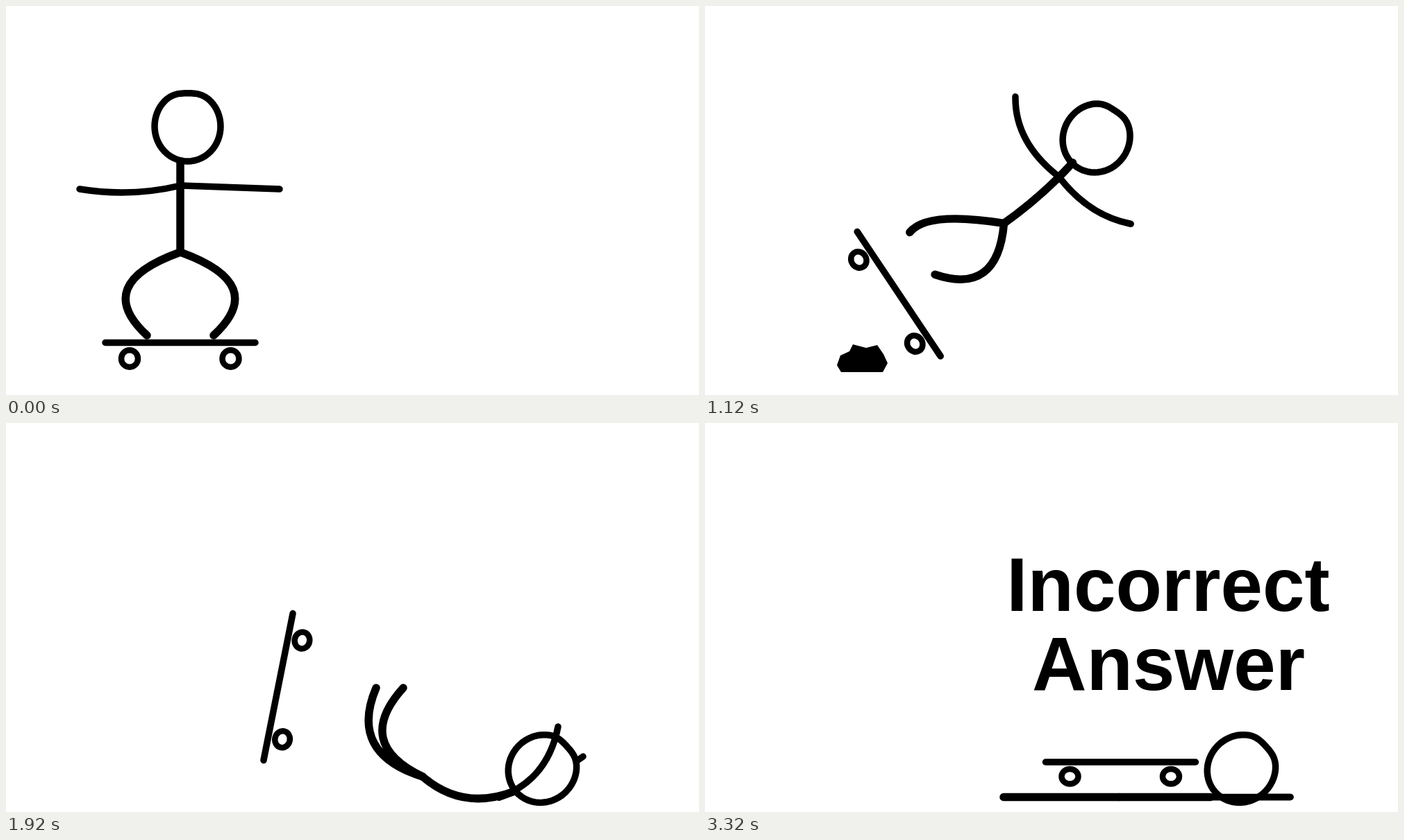
An HTML page for the animation above (3.76 s loop, 998x561 px).

```html
<!DOCTYPE html>
<html lang="en">
<head>
<meta charset="utf-8">
<title>Incorrect Answer</title>
<style>
  html, body { margin: 0; width: 100%; height: 100%; overflow: hidden; background: #fff; }
  svg { display: block; width: 100%; height: 100%; }
  .ink { fill: none; stroke: #000; stroke-width: 9.5; stroke-linecap: round; stroke-linejoin: round; }
  .thick { stroke-width: 11.5; }
  .head { fill: #fff; }
  .wheel { stroke-width: 8.5; }
  text { font: bold 108.8px "Liberation Sans", Arial, sans-serif; text-anchor: middle; }
</style>
</head>
<body>
<svg viewBox="0 0 998 561">
  <path id="rock" d="M0 518l5-14 13-6 5-10 19 5 16-4 9 13 6 13-7 13H6z"/>
  <g id="board" class="ink">
    <path d="M-108 0H108"/>
    <ellipse class="wheel" cx="-73" rx="12"/>
    <ellipse class="wheel" cx="72.500" rx="12"/>
  </g>
  <g class="ink">
    <path id="armR"/>
    <path id="head" class="head"/>
    <path id="armL"/>
    <path id="spine" class="thick"/>
    <path id="legs" class="thick"/>
  </g>
  <text id="word1" x="667">Incorrect</text>
  <text id="word2" x="667.500">Answer</text>
</svg>
<script>
const LOOP = 3760, STEP = 40;
const TRIP = 920, FLY = 1360, LAND = 1660, CRASH = 1920, FLAT = 2220;
const TOUCH = 2253, STOP = 3320, GROUND = 539.5, SPIN = 107;
const $ = id => document.getElementById(id);
const clamp = u => Math.max(0, Math.min(1, u));
const lerp = (a, b, u) => a + (b - a) * u;
const span = (t, from, to) => clamp((t - from) / (to - from));

// A pose is a set of joints; elbows, knees and back are curve handles.
const stand = {
  tilt: 0, head: [261.5, 173.5],
  neck: [251, 225], back: [251, 290], hip: [251, 355], shoulder: [251, 259],
  elbowL: [180, 276], handL: [106, 264], elbowR: [300, 261], handR: [394, 264],
  kneeL: [123, 401], footL: [203, 475], kneeR: [379, 401], footR: [299, 475]
};
const fly = {
  tilt: 73, head: [766.5, 344.5],
  neck: [716, 352], back: [648, 348], hip: [587, 313], shoulder: [694, 350],
  elbowL: [708, 261], handL: [793, 267.5], elbowR: [658, 440], handR: [742, 460],
  kneeL: [500, 247], footL: [527, 171], kneeR: [479, 286], footR: [488.5, 199]
};
const crash = {
  tilt: 48, head: [772.5, 498.5],
  neck: [732, 531], back: [658, 560], hip: [600, 510], shoulder: [710, 540],
  elbowL: [780, 515], handL: [795, 438], elbowR: [785, 515], handR: [831, 481],
  kneeL: [500, 462], footL: [572, 382], kneeR: [493, 476], footR: [533, 382]
};

const isLeg = joint => /knee|foot/.test(joint);
const mapPose = (pose, fn) => Object.fromEntries(
  Object.entries(pose).map(([k, v]) => [k, k === 'tilt' ? v : fn(v, k)]));

function mix(a, b, u) {
  const pose = mapPose(a, (p, k) => p.map((v, i) => lerp(v, b[k][i], u)));
  pose.tilt = lerp(a.tilt, b.tilt, u);
  return pose;
}

// Legs keep their flying shape on landing, then everything sinks to the ground.
const land = mapPose(crash, (p, k) =>
  isLeg(k) ? fly[k].map((v, i) => v + crash.hip[i] - fly.hip[i]) : p);
const lieX = { neck: 728, back: 660, hip: 596, shoulder: 705, elbow: 770, hand: 843, knee: 510, foot: 430 };
const flat = mapPose(crash, (p, k) => k === 'head' ? p : [lieX[k.replace(/[LR]$/, '')], GROUND]);

function turn([x, y], deg) {
  const r = deg * Math.PI / 180, c = Math.cos(r), s = Math.sin(r);
  return [x * c - y * s, x * s + y * c];
}

// The flight mixes both poses around the chest while it spins and travels.
const chest = { stand: [251, 290], fly: [650, 338] };
const around = (pose, [cx, cy], deg) => mapPose(pose, ([x, y]) => turn([x - cx, y - cy], -deg));
const standLocal = around(stand, chest.stand, 0);
const flyLocal = around(fly, chest.fly, SPIN);

function flight(u) {
  const x = lerp(chest.stand[0], chest.fly[0], u * (1.5 - .5 * u));
  const y = lerp(chest.stand[1], chest.fly[1], u) - 1000 * u * (1 - u) ** 4;
  return mapPose(mix(standLocal, flyLocal, u), p => {
    const [dx, dy] = turn(p, SPIN * u);
    return [x + dx, y + dy];
  });
}

const bobAt = t => (1 - Math.cos(3 * Math.PI * span(t, 0, TRIP))) / 2;

function poseAt(t) {
  if (t <= TRIP)
    return mapPose(stand, (p, k) => isLeg(k) ? [p[0], p[1] + 3 * bobAt(t)] : p);
  if (t < FLY) return flight(span(t, TRIP, FLY));
  if (t < LAND) {
    const u = span(t, FLY, LAND);
    return mix(fly, land, u * (.7 + .3 * u));
  }
  if (t < CRASH) return mix(land, crash, span(t, LAND, CRASH));
  return mix(crash, flat, span(t, CRASH, FLAT));
}

// A round head, slightly long and flattened on top.
function headPath() {
  let d = '';
  for (let deg = -180; deg < 180; deg += 6) {
    const a = deg * Math.PI / 180;
    const r = 49 + 1.5 * Math.cos(2 * a) - 2.8 * Math.exp(-((a / .35) ** 2));
    d += (d ? 'L' : 'M') + turn([0, -r], deg).map(v => v.toFixed(2));
  }
  return d + 'Z';
}
$('head').setAttribute('d', headPath());

const bend = (a, b, c) => `M${a}Q${b} ${c}`;

function drawMan(p) {
  $('head').setAttribute('transform', `translate(${p.head}) rotate(${p.tilt})`);
  $('spine').setAttribute('d', bend(p.neck, p.back, p.hip));
  $('armL').setAttribute('d', bend(p.shoulder, p.elbowL, p.handL));
  $('armR').setAttribute('d', bend(p.shoulder, p.elbowR, p.handR));
  $('legs').setAttribute('d', bend(p.hip, p.kneeL, p.footL) + bend(p.hip, p.kneeR, p.footR));
}

const wheels = document.querySelectorAll('.wheel');

function drawBoard(t) {
  const bob = bobAt(t), air = Math.max(0, Math.min(t, TOUCH) - TRIP);
  const roll = 1 - (1 - span(t, TOUCH, STOP)) ** 1.6;
  const x = lerp(251 + .141 * air, 598.5, roll);
  const y = lerp(485.5, 489, bob) - 3.257e-4 * air * (TOUCH - TRIP - air);
  const angle = 360 * span(t, TRIP, 2200);
  $('board').setAttribute('transform', `translate(${x} ${y}) rotate(${angle})`);
  for (const w of wheels) {
    w.setAttribute('cy', lerp(23, 20.7, bob));
    w.setAttribute('ry', lerp(12.2, 10.8, bob));
  }
}

// Each word fades in while it swings up past its line and settles.
function drawWord(id, base, t) {
  const s = clamp(t / 450);
  $(id).setAttribute('y', base + 64 * (1 - s) * Math.cos(1.13 * Math.PI * s));
  $(id).setAttribute('opacity', clamp(t / 340));
}

function draw(now) {
  const t = Math.floor(now % LOOP / STEP) * STEP;
  $('rock').setAttribute('transform', `translate(${345 - .775 * (t - TRIP)} 0)`);
  drawBoard(t);
  drawMan(poseAt(t));
  drawWord('word1', 271, t - 2340);
  drawWord('word2', 385, t - 2460);
}

const start = performance.now();
function tick() {
  draw(performance.now() - start);
  requestAnimationFrame(tick);
}
tick();
</script>
</body>
</html>
```
